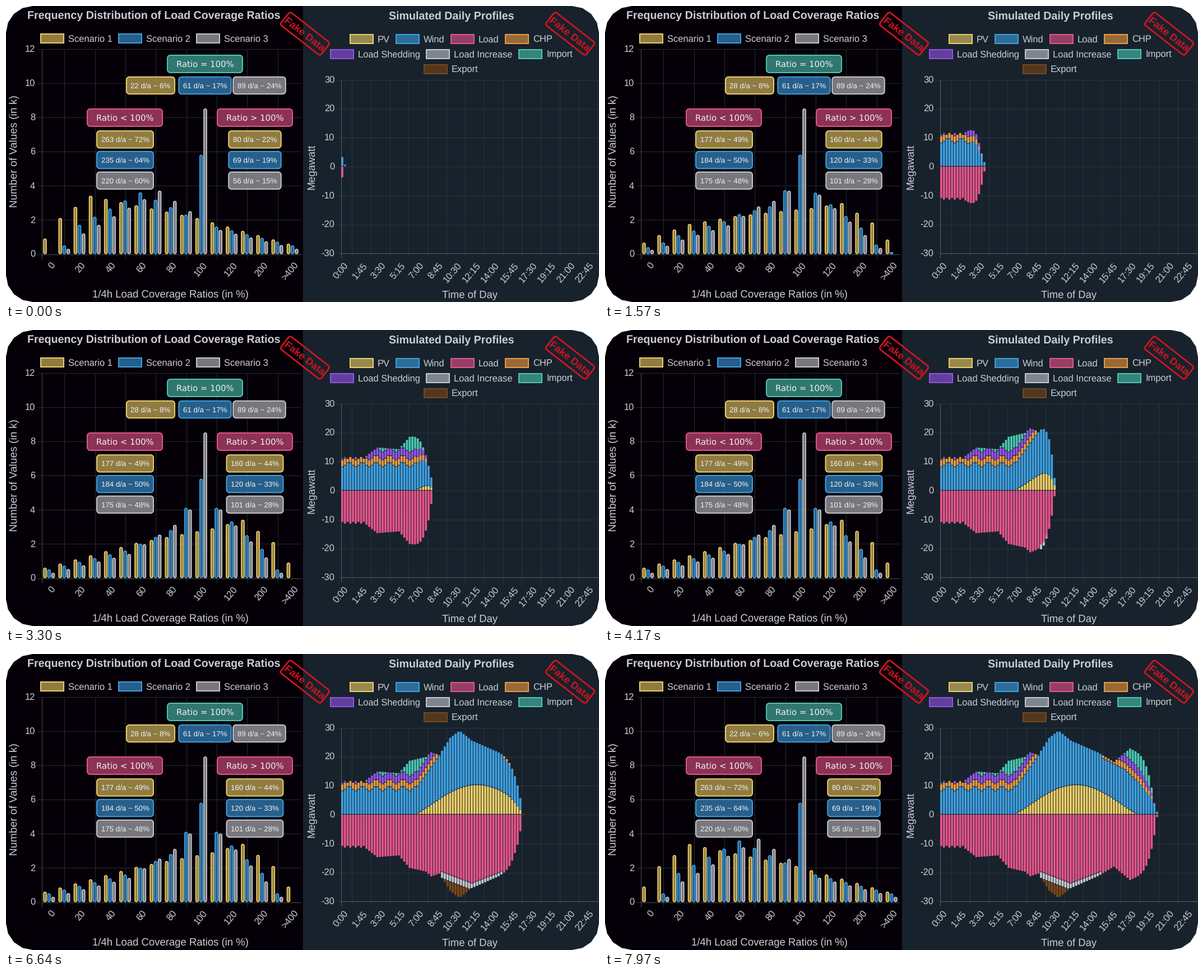
These frames come from a looping animation (1058x529 px, 8000 ms). A matplotlib script:

```python
import numpy as np
import matplotlib.pyplot as plt
from matplotlib.animation import FuncAnimation
from matplotlib.collections import PolyCollection
from matplotlib.colors import to_rgb
from matplotlib.patches import Polygon, Rectangle

W, H, DPI = 1058, 529, 64
PX = 72 / DPI  # points per pixel
LOOP, FRAMES = 8000, 120
STEP = LOOP / FRAMES

plt.rcParams["font.family"] = "Liberation Sans"
plt.rcParams["text.hinting"] = "none"

LEFT_BG, RIGHT_BG = "#050008", "#17222c"
TEXT, WHITE, RED = "#cbced3", "#f0f1f3", "#d0141f"
YELLOW, BLUE, GRAY, PINK, TEAL = "#ecce68", "#3d9fe0", "#c5c7cc", "#e5548a", "#4bc6b3"
ORANGE, PURPLE, BROWN = "#ec9a42", "#9453e6", "#7a4719"

fig = plt.figure(figsize=(W / DPI, H / DPI), dpi=DPI, facecolor="white")
ax = fig.add_axes([0, 0, 1, 1])
ax.set(xlim=(0, W), ylim=(H, 0))
ax.axis("off")


# ---------- helpers ----------
QUARTER = np.linspace(0, np.pi / 2, 5)


def rounded(x0, x1, y0, y1, r):
    """Rounded rectangles as an array of outlines, one per entry."""
    sides = (np.atleast_1d(np.asarray(v, float)) for v in (x0, x1, y0, y1))
    x0, x1, y0, y1 = (v[:, None] for v in np.broadcast_arrays(*sides))
    r = np.minimum(r, np.minimum(x1 - x0, y1 - y0) / 2)
    corners = [(x1 - r, y1 - r), (x0 + r, y1 - r), (x0 + r, y0 + r), (x1 - r, y0 + r)]
    xs = [cx + r * np.cos(QUARTER + i * np.pi / 2) for i, (cx, _) in enumerate(corners)]
    ys = [cy + r * np.sin(QUARTER + i * np.pi / 2) for i, (_, cy) in enumerate(corners)]
    return np.stack([np.concatenate(xs, axis=1), np.concatenate(ys, axis=1)], axis=-1)


def outline(cx, cy, w, h, r):
    """Path for a two pixel border kept inside the given size."""
    w, h = w / 2 - 1, h / 2 - 1
    return rounded(cx - w, cx + w, cy - h, cy + h, r)[0]


def dim(color, back, alpha=0.6):
    return alpha * np.array(to_rgb(color)) + (1 - alpha) * np.array(to_rgb(back))


def box(cx, cy, w, h, color, back=LEFT_BG, r=0):
    return ax.add_patch(Polygon(outline(cx, cy, w, h, r), fc=dim(color, back), ec=color,
                                lw=2 * PX, joinstyle="miter", zorder=6))


def label(x, y, s, size, ha="center", rot=0, color=TEXT, z=7, **font):
    """Text whose capitals are centred on y, measured across the writing direction."""
    a, drop = np.radians(rot), 0.36 * size
    return ax.text(x + drop * np.sin(a), y + drop * np.cos(a), s, fontsize=size * PX,
                   ha=ha, va="baseline", rotation=rot, rotation_mode="anchor",
                   color=color, zorder=z, **font)


def line(xs, ys, color, z=1):
    xs, ys = np.floor(xs) + 0.5, np.floor(ys) + 0.5
    ax.plot(xs, ys, color=color, lw=PX, zorder=z, solid_capstyle="butt")


def ease(p):
    return 1 - (1 - np.clip(p, 0, 1)) ** 4


def curve(x, *knots):
    return np.interp(x, *zip(*knots))


# ---------- background ----------
card = Polygon(rounded(0, W, 0, H, 48)[0], transform=ax.transData)
for x0, x1, color in ((0, 530, LEFT_BG), (530, W, RIGHT_BG)):
    half = ax.add_patch(Rectangle((x0, 0), x1 - x0, H, fc=color, lw=0, zorder=0))
    half.set_clip_path(card)

# ---------- axes ----------
L_X, L_Y, L_PITCH, L_UNIT = 63.2, 443, 27.15, 30.58
R_X, R_Y, R_PITCH, R_UNIT = 597.5, 286.5, 4.813, 5.175


def axes(left, right, zero, unit, values, names, pitch, skip, colors):
    faint, strong = colors
    ys = [zero - v * unit for v in values]
    for v, y in zip(values, ys):
        line([left - 8, right], [y, y], faint)
        label(left - 11, y + 0.3, str(v), 16.5, "right")
    for i, name in enumerate(names):
        x = left + pitch * (skip * i + 0.5)
        label(x + 7.5, 460, name, 16.5, "right", 50)
        if x + pitch * skip / 2 < right:
            line([x + pitch * skip / 2] * 2, [ys[-1], ys[0] + 8], faint)
    line([left, left], [ys[-1], ys[0] + 8], strong, 2)
    line([left, right], [ys[0], ys[0]], strong, 2)


ratios = [str(v) for v in range(0, 121, 20)] + ["200", ">400"]
times = [f"{m // 60}:{m % 60:02d}" for m in range(0, 1366, 105)]
axes(L_X, 525, L_Y, L_UNIT, range(0, 13, 2), ratios, L_PITCH, 2, ("#222c2e", "#4b4d52"))
axes(R_X, 1056, R_Y, R_UNIT, range(-30, 31, 10), times, R_PITCH, 7, ("#29343a", "#56606a"))

label(264, 16, "Frequency Distribution of Load Coverage Ratios", 19.6, weight="bold")
label(794.5, 17, "Simulated Daily Profiles", 19.6, weight="bold")
label(293.5, 514, "1/4h Load Coverage Ratios (in %)", 18.55)
label(828, 515.5, "Time of Day", 18.55)
label(13.5, 259.5, "Number of Values (in k)", 19.3, rot=90)
label(543.5, 287, "Megawatt", 18.8, rot=90)


# ---------- legends ----------
def legend(cx, y, items, back):
    """One centred row of colour boxes, each followed by its name."""
    texts = [label(0, y, name, 16.5, "left") for name, _ in items]
    widths = [t.get_window_extent().width for t in texts]
    x = round(cx - (sum(widths) + 60 * len(items) - 10) / 2)
    for text, width, (_, color) in zip(texts, widths, items):
        box(x + 21.5, y, 43, 18, color, back)
        text.set_x(x + 50)
        x = round(x + width + 60)


SCENARIOS = (YELLOW, BLUE, GRAY)
legend(264, 58, [(f"Scenario {i + 1}", c) for i, c in enumerate(SCENARIOS)], LEFT_BG)
legend(794, 59, [("PV", YELLOW), ("Wind", BLUE), ("Load", PINK), ("CHP", ORANGE)], RIGHT_BG)
legend(794, 86, [("Load Shedding", PURPLE), ("Load Increase", GRAY), ("Import", TEAL)], RIGHT_BG)
legend(794, 113, [("Export", BROWN)], RIGHT_BG)

# ---------- stamps ----------
TILT = 38
a = np.radians(TILT)
turn = np.array([[np.cos(a), np.sin(a)], [-np.sin(a), np.cos(a)]])
for cx in (533.5, 1006.5):
    frame = rounded(-45.5, 45.5, -14.5, 14.5, 4)[0] @ turn + (cx, 49.5)
    ax.add_patch(Polygon(frame, fill=False, ec=RED, lw=2.8 * PX, zorder=8))
    label(cx, 49.5, "Fake Data", 18.4, rot=-TILT, color=RED, z=8, weight="bold")

# ---------- ratio boxes ----------
for cx, cy, sign, color in ((355, 103.5, "=", TEAL), (212, 199.5, "<", PINK),
                            (444, 199.5, ">", PINK)):
    box(cx, cy, 136, 33, color, r=5)
    label(cx, cy, f"Ratio {sign} 100%", 14.9, color=WHITE, family="DejaVu Sans")


class Count:
    """Days per year in one ratio class, for both states of the switch."""

    def __init__(self, cx, cy, days, color):
        self.cx, self.cy = cx, cy
        self.names = [self.name(d) for d in days]
        self.widths = [88 + 7.5 * (len(s) - 11) for s in self.names]
        self.box = box(cx, cy, self.widths[0], 32.5, color, r=5)
        self.text = label(cx, cy, self.names[0], 13.3, color=WHITE)

    @staticmethod
    def name(days):
        share = round(days / 3.65, 1)
        return f"{days} d/a ~ {int(share + 0.5)}%"

    def show(self, mix, state):
        w = self.widths[0] + (self.widths[1] - self.widths[0]) * mix
        self.box.set_xy(outline(self.cx, self.cy, w, 32.5, 5))
        self.text.set_text(self.names[state])


# first box centre, step to the next one, days before and after the switch
CLASSES = [
    ((258, 142), (97, 0), (22, 61, 89), (28, 61, 89)),
    ((212.5, 238.5), (0, 36.75), (263, 235, 220), (177, 184, 175)),
    ((444, 238.5), (0, 36.75), (80, 69, 56), (160, 120, 101)),
]
counts = [Count(x + i * dx, y + i * dy, days, SCENARIOS[i])
          for (x, y), (dx, dy), *states in CLASSES
          for i, days in enumerate(zip(*states))]

# ---------- histogram ----------
group = np.arange(17)
SLOT = L_PITCH * 0.8 / 3


def spread(*knots, peak=None):
    """Piecewise linear distribution with an optional spike at 100 %."""
    values = curve(group, *knots)
    if peak:
        values[10] = peak
    return values


BEFORE = np.array([
    spread((0, .9), (1, 2.1), (3, 3.4), (10, 2.1), (16, .6)),
    spread((0, 0), (1, .5), (2, 1.7), (6, 3.6), (9, 2.3), (11, 1.6), (16, .5), peak=5.8),
    spread((0, 0), (1, .3), (2, 1.2), (7, 3.7), (9, 2.5), (11, 1.4), (16, .3), peak=8.5),
])
AFTER = np.array([
    spread((0, .6), (6, 2.05), (11, 2.9), (13, 3.4), (15, 2.1), (16, .9)),
    spread((0, .5), (5, 1.6), (8, 2.8), (9, 4.1), (11, 4.1), (14, 1.7), (15, .5), (16, 0), peak=5.8),
    spread((0, .3), (5, 1.4), (8, 3.1), (9, 4), (11, 4), (14, 1.2), (15, .3), (16, 0), peak=8.5),
])
histogram = [ax.add_collection(PolyCollection([], facecolors=[dim(c, LEFT_BG)], edgecolors=c,
                                              linewidths=1.8 * PX, zorder=4))
             for c in SCENARIOS]

# ---------- daily profile: quarter hours, supply balances demand ----------
n = np.arange(96)
surplus_time = (n > 36) & (n < 60)

total = curve(n, (8, 11.3), (13, 14.9), (21, 14.3), (25, 18.6), (31, 19.9), (33, 21.5),
              (36, 20.6), (40, 26.5), (43.5, 29), (48, 25.6), (58, 21.5), (64, 18.2),
              (70, 22.8), (79, 19))
total -= np.where(n < 9, 0.3 * (-1.0) ** n, 0)

pv = 10.2 * np.sin(np.pi * np.clip((n - 27) / 46, 0, 1)) ** 1.2
night = 8.9 + 0.8 * np.cos(2 * np.pi * (n - 12.5) / 5)
morning = curve(n, (28, 9.8), (36, 20.4))
evening = curve(n, (60, 19.3), (68, 15.5), (76, 8.6))
green = np.select([n < 28, n < 37, n < 60], [night, morning, total], evening)
green = np.minimum(green, total)
chp = np.minimum(green + 2.4, total)
shed = np.minimum(chp + 2.7, total)
load = np.where(surplus_time, np.minimum(total, 23.8 - 0.36 * np.abs(n - 48)), total)
more = np.minimum(load + 2.3, total)

STACK = [
    (0 * n, pv, YELLOW), (pv, green, BLUE), (0 * n, -load, PINK), (green, chp, ORANGE),
    (chp, shed, PURPLE), (-load, -more, GRAY), (shed, total, TEAL), (-more, -total, BROWN),
]
profile = [ax.add_collection(PolyCollection([], facecolors=c, linewidths=0, zorder=5 - 0.1 * d))
           for d, (_, _, c) in enumerate(STACK)]

# ---------- motion ----------
GROW = 1000
BAR_DELAY, SERIES_DELAY, LEAD = 100.3, 16, 137
SWITCH, BACK = 1208, 7208


def draw_profile(t):
    for d, (base, head, _) in enumerate(STACK):
        f = ease((t + LEAD - BAR_DELAY * n - SERIES_DELAY * d) / GROW)
        a, b = R_Y - R_UNIT * base * f, R_Y - R_UNIT * head * f
        top, low = np.minimum(a, b) + 0.4, np.maximum(a, b) - 0.4
        on = low - top > 0.2
        x = R_X + R_PITCH * (n[on] + 0.5)
        profile[d].set_verts(rounded(x - 1.9, x + 1.9, top[on], low[on], 1.2))


def draw_histogram(mix):
    for i, values in enumerate(BEFORE + (AFTER - BEFORE) * mix):
        on = values * L_UNIT > 2
        x = L_X + L_PITCH * (group[on] + 0.1) + SLOT * (i + 0.5)
        top = L_Y - values[on] * L_UNIT + 0.9
        histogram[i].set_verts(rounded(x - 2.4, x + 2.4, top, L_Y - 0.4, 2.3))


def update(k):
    t = k * STEP
    mix = ease((t - SWITCH) / GROW) - ease((t - BACK) / GROW)
    draw_profile(t)
    draw_histogram(mix)
    for count in counts:
        count.show(mix, int(SWITCH <= t < BACK))
    return []


anim = FuncAnimation(fig, update, frames=FRAMES, interval=STEP, repeat=True,
                     repeat_delay=0, blit=False)
plt.show()
```
